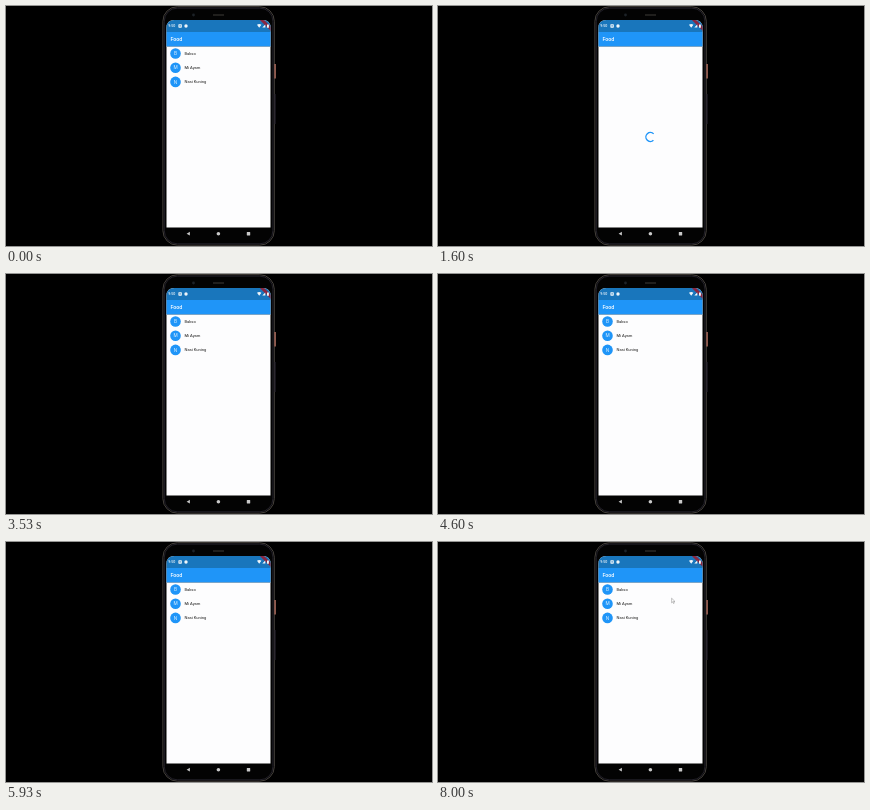
An HTML page for the animation above (8.07 s loop, 426 by 240 pixels).

```html
<!DOCTYPE html>
<html lang="en">
<head>
<meta charset="utf-8">
<title>Food list</title>
<style>
  html, body { margin: 0; width: 100%; height: 100%; overflow: hidden; background: #000; }
  svg { display: block; width: 100vw; height: 100vh; }
  text { font-family: Roboto, "Noto Sans", sans-serif; }
  .title { font-size: 5.3px; font-weight: 500; fill: #fff; }
  .clock { font-size: 3.6px; font-weight: 500; fill: #f2f7fb; }
  .row { font-size: 4.1px; fill: #1c1c1c; }
  .letter { font-size: 4.8px; fill: #d9eefd; text-anchor: middle; }
</style>
</head>
<body>
<svg viewBox="0 0 426 240" aria-label="Phone with a food list">
  <defs>
    <clipPath id="screen"><path d="M160.5 221.5V22q0-8 8-8h88q8 0 8 8v199.5z"/></clipPath>
  </defs>
  <rect width="426" height="240" fill="#000"/>

  <!-- phone body -->
  <g fill="none">
    <rect x="156.9" y=".7" width="111.4" height="238.5" rx="14.5" fill="#030303" stroke="#45413c" stroke-width="1"/>
    <rect x="158.3" y="2.1" width="108.6" height="235.7" rx="13" stroke="#222029" stroke-width="1"/>
    <path d="M269.1 58v14.5" stroke="#a9695c" stroke-width="1.5"/>
    <path d="M269 88v30" stroke="#25222e" stroke-width="1.2"/>
    <path d="M207 9h11" stroke="#35332f" stroke-width="1.2"/>
  </g>
  <circle cx="187.5" cy="9" r="1.4" fill="#1d2227"/>

  <!-- screen -->
  <g clip-path="url(#screen)">
    <rect x="160" y="14" width="105" height="208" fill="#fdfdfe"/>
    <rect x="160" y="40" width="105" height="1" fill="#8fa9bd"/>
    <rect x="160" y="14" width="105" height="12" fill="#1976bc"/>
    <rect x="160" y="26" width="105" height="14.2" fill="#1f95f8"/>
    <path d="M254 12L266 24" stroke="#8a2740" stroke-width="3"/>
    <text class="clock" x="162.2" y="21.3">9:50</text>
    <g fill="#f0f6fa">
      <rect x="172.4" y="18.2" width="3.4" height="3.5" rx=".6"/>
      <circle cx="180" cy="20" r="1.7"/>
      <path d="M251 18.8q2.2-1.6 4.4 0L253.2 21.7zM256.3 21.6h3v-3.2z"/>
      <rect x="261" y="18.4" width="1.9" height="3.3" rx=".3"/>
    </g>
    <rect x="173.5" y="19.3" width="1.2" height="1.2" fill="#1976bc"/>
    <text class="title" x="164.4" y="35.3">Food</text>
    <g id="list"></g>
    <path id="spinner" fill="none" stroke="#1f95f8" stroke-width="1.4"/>
  </g>

  <!-- navigation bar -->
  <g fill="#c9c9c9">
    <path d="M180.6 227.7l3.3-1.9v3.8z"/>
    <circle cx="212.4" cy="227.7" r="1.8"/>
    <rect x="240.8" y="226" width="3.4" height="3.4" rx=".3"/>
  </g>

  <path id="cursor" d="M0 0v4.6l1.1-1 .8 1.7 .8-.4-.8-1.6h1.5z" fill="#fff" stroke="#555" stroke-width=".35"/>
</svg>
<script>
  const LOOP = 8070, STEP = 1000 / 15;
  const LOAD_START = 1000, LOAD_END = 3000;
  const CURSOR_IN = 6860, CURSOR_REST = 7530;
  const TAU = Math.PI * 2;
  const $ = id => document.getElementById(id);
  const list = $("list"), spinner = $("spinner"), cursor = $("cursor");

  list.innerHTML = ["Bakso", "Mi Ayam", "Nasi Kuning"].map((name, i) => {
    const y = 47.5 + i * 14.2;
    return `<circle cx="169.5" cy="${y}" r="5.3" fill="#1f95f8"/>
      <text class="letter" x="169.5" y="${y + 1.7}">${name[0]}</text>
      <text class="row" x="178.5" y="${y + 1.5}">${name}</text>`;
  }).join("");

  const clamp = v => Math.min(1, Math.max(0, v));

  // cubic-bezier(.4, 0, .2, 1), solved by bisection
  function ease(x) {
    let lo = 0, hi = 1;
    for (let i = 0; i < 20; i++) {
      const s = (lo + hi) / 2, r = 1 - s;
      if (1.2 * r * r * s + 0.6 * r * s * s + s ** 3 < x) lo = s; else hi = s;
    }
    return 3 * (1 - lo) * lo * lo + lo ** 3;
  }

  // Material indeterminate arc: growing head, chasing tail, slow turn
  function arc(t) {
    const cycle = (t / 1333) % 1, turn = (t / 2222) % 1;
    const head = ease(clamp(cycle * 2)), tail = ease(clamp(cycle * 2 - 1));
    const from = TAU * (-0.25 + tail * 0.75 + turn + cycle * 0.25);
    const sweep = Math.max((head - tail) * 0.75 * TAU, 0.001);
    const point = a => `${212.4 + 4.5 * Math.cos(a)} ${131 + 4.5 * Math.sin(a)}`;
    return `M${point(from)}A4.5 4.5 0 ${sweep > Math.PI ? 1 : 0} 1 ${point(from + sweep)}`;
  }

  function draw(now) {
    const t = Math.floor((now % LOOP) / STEP + 0.01) * STEP;
    const loading = t >= LOAD_START - 1 && t < LOAD_END - 1;
    list.style.display = loading ? "none" : "";
    spinner.style.display = loading ? "" : "none";
    if (loading) spinner.setAttribute("d", arc(Math.max(0, t - LOAD_START)));

    cursor.style.display = t >= CURSOR_IN ? "" : "none";
    const p = ease(clamp((t - CURSOR_IN - STEP) / (CURSOR_REST - CURSOR_IN)));
    cursor.setAttribute("transform", `translate(${249.6 - 16 * p} ${29.6 + 26.6 * p})`);
  }

  const start = performance.now();
  function tick() {
    draw(performance.now() - start);
    requestAnimationFrame(tick);
  }
  tick();
</script>
</body>
</html>
```
